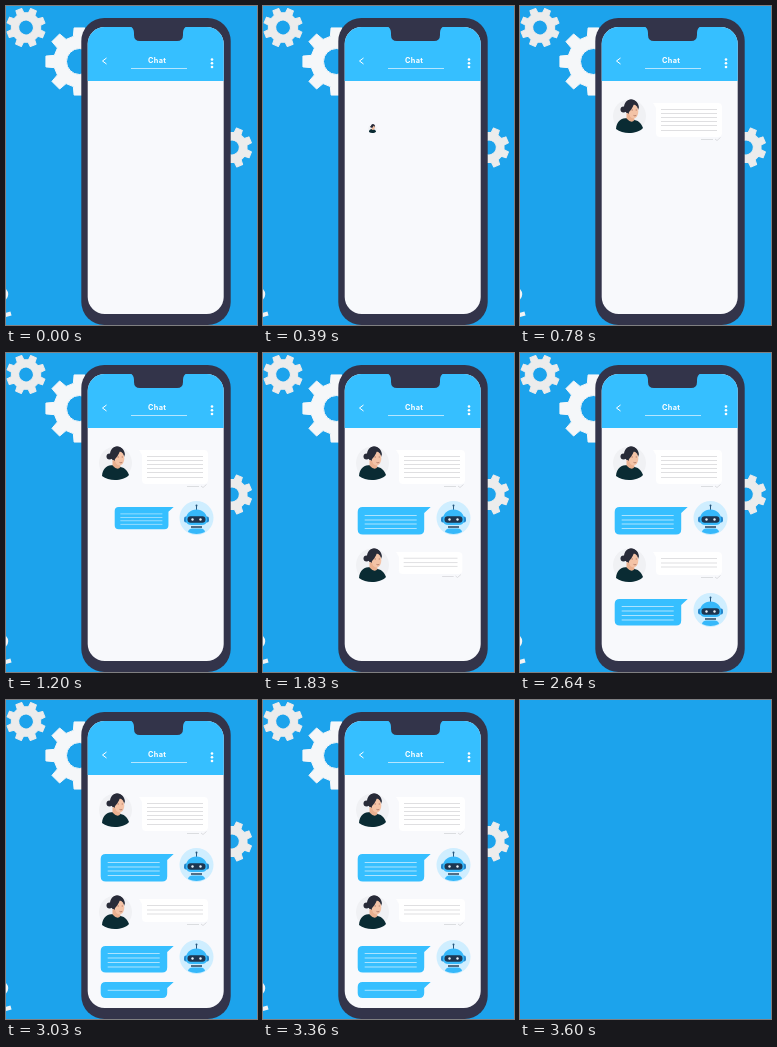
Recreate the animation shown at these times as an HTML page. Size 251x319 px, loop 3630 ms.

```html
<!DOCTYPE html>
<html lang="en">
<head>
<meta charset="utf-8">
<title>Chat</title>
<style>
html, body { margin: 0; width: 100%; height: 100%; overflow: hidden; background: #1ca3ec; }
svg { display: block; width: 100vw; height: 100vh; }
text { font: 700 7.3px Inter, "Open Sans", sans-serif; letter-spacing: .35px; }
</style>
</head>
<body>
<svg viewBox="0 0 251 319">
  <defs>
    <clipPath id="screen"><rect x="81.700" y="21" width="136" height="287" rx="17"/></clipPath>
    <g id="woman">
      <circle r="16.500" cy="-17" fill="#f0f1f4"/>
      <circle cx="-6" cy="-23.500" r="3" fill="#282b38"/>
      <ellipse cx="1.500" cy="-26" rx="7" ry="7.500" fill="#282b38"/>
      <path d="M-13.500 -4C-13 -12 -8 -15 -2 -15L5 -13C10 -12 12 -9 13.500 -5C8 1 -6 2 -13.500 -4Z" fill="#0a2b33"/>
      <path d="M-3 -20L4 -18L5 -13Q2 -9 -3 -14.500Z" fill="#eab08f"/>
      <ellipse cx="4" cy="-21.500" rx="4.800" ry="7" fill="#f4c3a6"/>
      <path d="M-5 -22C-6 -30 -2 -34 2 -33.500C7 -33 10 -29 9.500 -23C8.500 -27 6.500 -28.500 4.500 -29C3 -25 1 -22 -1.500 -20Z" fill="#282b38"/>
      <path d="M2 -23h1.500M6.200 -23h1.300M4 -17.600q1.400 .9 2.800 0" fill="none" stroke="#8a5347" stroke-width=".6"/>
    </g>
    <g id="robot">
      <circle r="17" cy="-17" fill="#cfeeff"/>
      <path d="M0 -25v-4.500" stroke="#27587f" stroke-width="1"/>
      <circle cy="-29.500" r="1" fill="#27587f"/>
      <rect x="-12.500" y="-18.500" width="25" height="6" rx="2" fill="#2487cc"/>
      <path d="M-10.500 -14.500C-11 -21.500 -6 -25.500 0 -25.500S11 -21.500 10.500 -14.500Q10 -10 5 -10H-5Q-10 -10 -10.500 -14.500Z" fill="#36b8fa"/>
      <rect x="-9" y="-18.800" width="18" height="6.600" rx="3.200" fill="#1d3550"/>
      <circle cx="-4" cy="-15.500" r="1.200" fill="#e9f4fa"/><circle cx="4" cy="-15.500" r="1.200" fill="#e9f4fa"/>
      <path d="M-5.500 -8h11" stroke="#1d3550" stroke-width="1.400"/>
      <path d="M-8.500 -3Q-8 -6.500 -4 -6.500H4Q8 -6.500 8.500 -3Q0 1 -8.500 -3Z" fill="#36b8fa"/>
    </g>
  </defs>
  <g id="all">
    <g id="gears"></g>
    <g fill="none" stroke="#f1f3f5">
      <path d="M-2 283Q3.500 288 -2 293.500" stroke-width="3"/>
      <path d="M-2 309.500L5 307.500" stroke-width="4"/>
    </g>
    <rect x="75.300" y="12" width="149.400" height="307" rx="23" fill="#33344a"/>
    <g clip-path="url(#screen)">
      <rect x="81" y="21" width="137" height="287" fill="#f8f9fc"/>
      <rect x="81" y="21" width="137" height="54" fill="#36bfff"/>
    </g>
    <path d="M124 20H181Q177 22 177 27V29Q177 35 171 35H134Q128 35 128 29V27Q128 22 124 20Z" fill="#33344a"/>
    <path d="M100.500 52L96.500 55L100.500 58" fill="none" stroke="#fff" stroke-width="1"/>
    <text x="151.200" y="57" text-anchor="middle" fill="#fff">Chat</text>
    <path d="M125 62.500H181" stroke="#b5e6ff" stroke-width="1"/>
    <g fill="#fff">
      <circle cx="206" cy="53.500" r="1.300"/><circle cx="206" cy="57.200" r="1.300"/><circle cx="206" cy="61" r="1.300"/>
    </g>
    <g id="chat"></g>
  </g>
</svg>
<script>
const LOOP = 3630, END = 3600, GROW = 300, LAG = 115;
const $ = id => document.getElementById(id);
const ease = p => p < .5 ? 4 * p ** 3 : 1 - (2 - 2 * p) ** 3 / 2;
const grow = (t, start) => ease(Math.min(1, Math.max(0, (t - start) / GROW)));
const parts = [];

function add(parent, markup) {
  const g = document.createElementNS("http://www.w3.org/2000/svg", "g");
  g.innerHTML = markup;
  parent.append(g);
  return g;
}

function gear(x, y, r, hole, fill, turn) {
  const points = [];
  for (let i = 0; i < 8; i++)
    for (const [a, k] of [[-.24, .76], [-.16, 1], [.16, 1], [.24, .76]]) {
      const angle = i * Math.PI / 4 + a;
      points.push((Math.cos(angle) * r * k).toFixed(2) + " " + (Math.sin(angle) * r * k).toFixed(2));
    }
  const ring = `M${-hole} 0a${hole} ${hole} 0 1 0 ${2 * hole} 0a${hole} ${hole} 0 1 0 ${-2 * hole} 0Z`;
  add($("gears"), `<path d="M${points.join("L")}Z${ring}" fill="${fill}" fill-rule="evenodd" stroke="${fill}"
    stroke-linejoin="round" transform="translate(${x} ${y}) rotate(${turn})"/>`);
}

function part(x, y, start, markup) {
  parts.push({ x, y, start, el: add($("chat"), markup) });
}

const rules = (x1, x2, ys, color) =>
  `<path d="${ys.map(y => `M${x1} ${y}H${x2}`).join("")}" stroke="${color}" stroke-width=".9"/>`;

function asked(y, h, start, ys) {
  part(109.5, y + 30, start, '<use href="#woman"/>');
  part(133, y, start + LAG,
    `<path d="M0 0H65Q69 0 69 4V${h - 4}Q69 ${h} 65 ${h}H7Q3 ${h} 3 ${h - 4}V5Z" fill="#fff"/>` +
    rules(8, 64, ys, "#dcdcde") +
    `<path d="M48 ${h + 2.5}H60M62 ${h + 2}l2 1.500l3.500 -3" fill="none" stroke="#d5d6da" stroke-width=".8"/>`);
}

function bubble(y, h, start, ys) {
  part(167.7, y, start,
    `<path d="M-68 0H0L-6.500 6V${h - 5}Q-6.500 ${h} -11.500 ${h}H-68Q-73 ${h} -73 ${h - 5}V5Q-73 0 -68 0Z" fill="#36bfff"/>` +
    rules(-66, -14, ys, "#b9e8ff"));
}

function answered(y, h, start, ys) {
  part(190.5, y + 28, start, '<use href="#robot"/>');
  bubble(y, h, start + LAG, ys);
}

gear(20, 21.5, 19.5, 7.4, "#ececec", 23);
gear(73.5, 55.5, 34, 13, "#f5f7f9", 0);
gear(226, 141.5, 20, 7.4, "#ececec", 22);

asked(97, 34, 270, [6.5, 10.5, 14.5, 18.5, 22.5, 27.5]);
answered(154, 27.5, 895, [8.5, 13, 17, 21.5]);
asked(199, 23, 1480, [6.5, 11, 15]);
answered(246, 26.5, 2130, [7.5, 12, 16.5, 21]);
bubble(282, 16, 2620, [8.3]);

function draw(t) {
  $("all").style.display = t < END ? "" : "none";
  for (const p of parts) {
    const s = grow(t, p.start);
    p.el.style.display = s > 0 ? "" : "none";
    p.el.setAttribute("transform", `translate(${p.x} ${p.y}) scale(${s})`);
  }
}

const begin = performance.now();
function tick() {
  draw((performance.now() - begin) % LOOP);
  requestAnimationFrame(tick);
}
tick();
</script>
</body>
</html>
```
